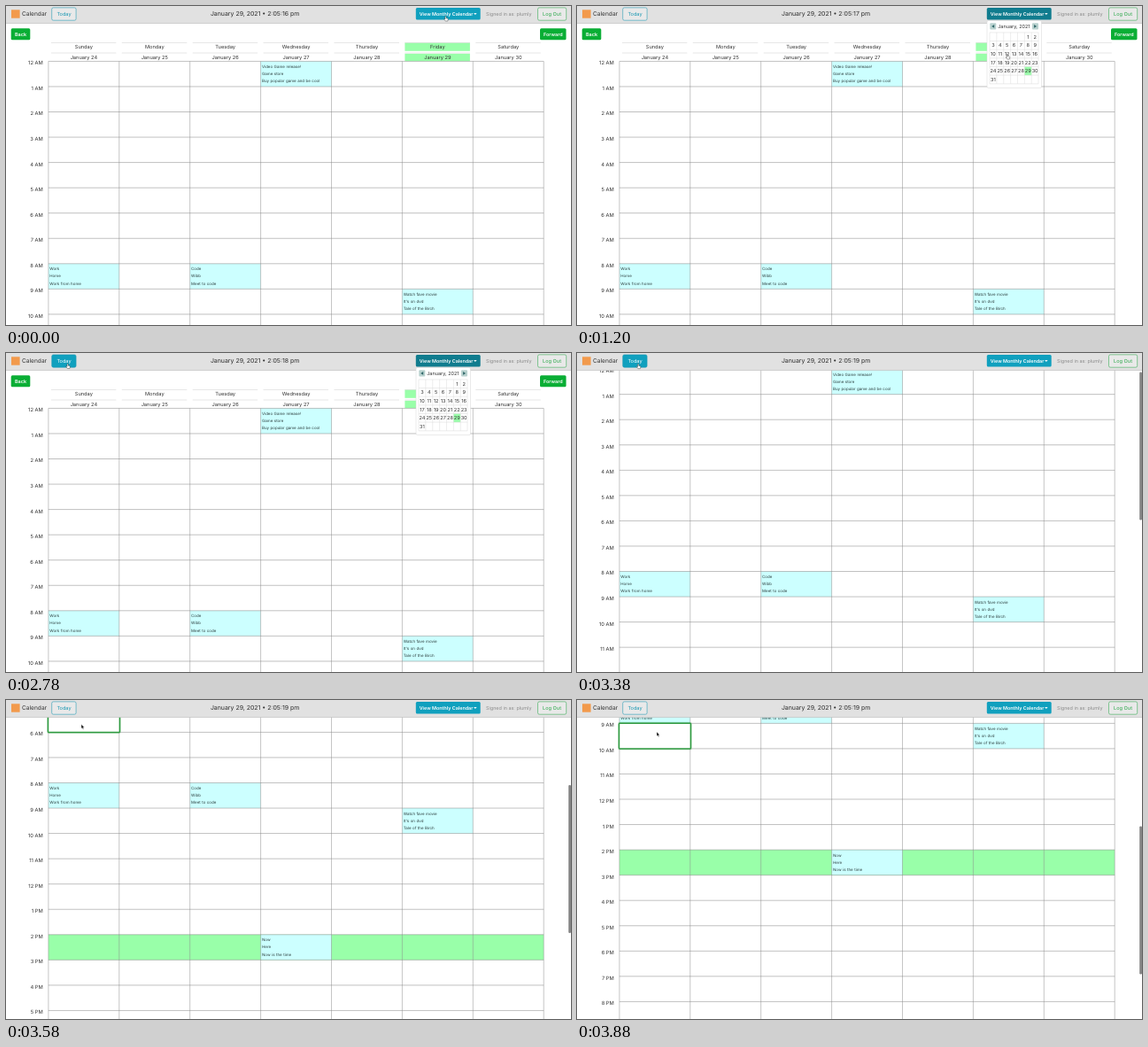
An HTML page for the animation above (3900 ms loop, 638x360 px).

```html
<!DOCTYPE html>
<html lang="en">
<head>
<meta charset="utf-8">
<title>Calendar</title>
<style>
  html, body { margin: 0; width: 100%; height: 100%; overflow: hidden; background: #fff; }
  svg { display: block; width: 638px; height: 360px; }
  text { font-family: Inter, Roboto, "Liberation Sans", sans-serif; text-rendering: geometricPrecision; }
  .note { word-spacing: .06em; }
</style>
</head>
<body>
<svg id="stage" viewBox="0 0 638 360" xmlns="http://www.w3.org/2000/svg"></svg>
<script>
const LOOP = 3900;
const LEFT = 47.9, TOP = 62.4, COL = 79.9, ROW = 28.55;
const RIGHT = LEFT + 7 * COL, BOTTOM = TOP + 24 * ROW;
const GREEN = '#99ffa9', CYAN = '#ccffff', TEAL = [16, 160, 190], DEEP = [16, 124, 142];

const DAYS = ['Sunday', 'Monday', 'Tuesday', 'Wednesday', 'Thursday', 'Friday', 'Saturday'];
const EVENTS = [
  { day: 3, hour: 0, lines: ['Video Game release!', 'Game store', 'Buy popular game and be cool'] },
  { day: 0, hour: 8, lines: ['Work', 'Home', 'Work from home'] },
  { day: 2, hour: 8, lines: ['Code', 'Wibb', 'Meet to code'] },
  { day: 5, hour: 9, lines: ['Watch fave movie', "It's on dvd", 'Tale of the Birch'] },
  { day: 3, hour: 14, lines: ['Now', 'Here', 'Now is the time'] }
];

// Pointer tip: time, x, y
const PATH = [
  [0, 496.5, 11.5], [560, 496.5, 11.5], [800, 492, 33], [1080, 486.5, 54], [1200, 486, 54.5],
  [1300, 488, 62], [1400, 470, 52], [1500, 350, 34], [1620, 155, 19], [1820, 124, 17.5],
  [1960, 124, 17.5], [2200, 108, 26], [2460, 70, 12], [3380, 69, 12], [3500, 85, 27.5],
  [3740, 85, 27.5], [3880, 90, 36]
];
const TICKS = [600, 1600, 2800];
const OPEN = 280, CLOSE = 2900;
const SCROLL = { from: 3219, to: 3819, by: 293 };

const rect = (x, y, w, h, fill, extra = '') =>
  `<rect x="${x}" y="${y}" width="${w}" height="${h}" fill="${fill}" ${extra}/>`;
const line = (x1, y1, x2, y2, color, width = 0.5) =>
  `<path d="M${x1} ${y1}L${x2} ${y2}" stroke="${color}" stroke-width="${width}"/>`;
// y is the middle of the capitals
const text = (str, x, y, size, fill = '#333', anchor = 'middle', extra = '') =>
  `<text x="${x}" y="${y + size * 0.36}" font-size="${size}" fill="${fill}" text-anchor="${anchor}" ${extra}>${str}</text>`;
const BOLD = 'font-weight="600"';

function dayHeads() {
  return DAYS.map((name, i) => {
    const x = LEFT + i * COL, mid = x + COL / 2;
    const tint = i === 5 ? rect(x + 3, 41.5, 73.5, 9.3, GREEN) + rect(x + 3, 53.8, 73.5, 8.4, GREEN) : '';
    return tint + line(x + 3, 41.5, x + 76.5, 41.5, '#cfcfcf') + line(x + 3, 53, x + 76.5, 53, '#cfcfcf')
      + text(name, mid, 46.2, 5.7) + text(`January ${24 + i}`, mid, 58, 5.7);
  }).join('');
}

function grid() {
  let out = rect(LEFT, TOP + 14 * ROW, 7 * COL, ROW, GREEN);
  for (const e of EVENTS) out += rect(LEFT + e.day * COL, TOP + e.hour * ROW, COL, ROW, CYAN);
  for (let h = 0; h <= 24; h++) {
    const y = TOP + h * ROW;
    out += line(LEFT, y, RIGHT, y, '#808080');
    if (h < 24) out += text(`${h % 12 || 12} ${h < 12 ? 'AM' : 'PM'}`, 41.8, y + 1.9, 5.8, '#333', 'end');
  }
  for (let c = 0; c <= 7; c++) {
    const x = LEFT + c * COL;
    out += line(x, TOP, x, BOTTOM, '#8a8a8a');
  }
  return out;
}

function eventTexts() {
  return EVENTS.map(e => e.lines.map((s, i) =>
    text(s, LEFT + e.day * COL + 1.4, TOP + e.hour * ROW + 5.9 + i * 8.15, 4.45, '#2c3c3c', 'start', 'class="note"')).join('')).join('');
}

function picker() {
  const x0 = 466, y0 = 29.9, w = 7.87, h = 9.65;
  let out = rect(463, 16.5, 61.5, 76, '#fff', 'rx="1.5" stroke="#d4d4d4" stroke-width=".5"');
  for (const [x, s] of [[466.3, -1], [514, 1]]) {
    const c = x + 3.5;
    out += rect(x, 19.3, 7, 7.2, '#b9d2cf', 'rx="1"')
      + `<path d="M${c + 1.6 * s} 22.9l${-3 * s} -1.8v3.6z" fill="#2f6668"/>`;
  }
  out += text('January, 2021', 493.4, 23.3, 5.5);
  out += rect(x0 + 5 * w, y0 + 4 * h, w, h, GREEN);
  for (let r = 0; r <= 6; r++) out += line(x0, y0 + r * h, x0 + 7 * w, y0 + r * h, '#dadada');
  for (let c = 0; c <= 7; c++) out += line(x0 + c * w, y0, x0 + c * w, y0 + 6 * h, '#dadada');
  for (let d = 1; d <= 31; d++) {
    const cell = d + 4;
    out += text(d, x0 + (cell % 7 + 0.5) * w, y0 + (Math.floor(cell / 7) + 0.5) * h, 5.6);
  }
  return out;
}

const stage = document.getElementById('stage');
stage.innerHTML = `
  ${rect(0, 0, 638, 360, '#fff')}
  <g id="page">
    ${rect(5.7, 25.2, 21.6, 13, '#0aae35', 'rx="1.5"')}${text('Back', 16.5, 31.7, 5.5, '#fff', 'middle', BOLD)}
    ${rect(603, 25.2, 29.5, 13, '#0aae35', 'rx="1.5"')}${text('Forward', 617.8, 31.7, 5.4, '#fff', 'middle', BOLD)}
    ${dayHeads()}${grid()}
    <g id="focus">
      ${rect(0, 0, COL + 1, ROW, 'none', 'stroke="#2f9a40" stroke-opacity=".25" stroke-width="3" rx="1"')}
      <rect id="cell" width="${COL + 1}" height="${ROW}" stroke="#2f9a40" stroke-width="1.5" rx=".8"/>
    </g>
    ${eventTexts()}
  </g>
  ${rect(0, 0, 638, 19.6, '#e1e1e1')}${line(0, 19.5, 638, 19.5, '#bdbdbd', 0.6)}
  ${rect(6, 4.3, 9.6, 9.4, '#f29a4c')}
  ${text('Calendar', 18, 9, 6.6, '#333', 'start')}
  <rect id="today" x="51.7" y="1.9" width="27.4" height="14.3" rx="1.8" stroke="#1897b2" stroke-width=".55"/>
  ${text('Today', 65.5, 9, 5.6, '#1897b2', 'middle', 'id="todayText"')}
  ${text('', 281.1, 8.2, 6.95, '#2b2b2b', 'middle', 'id="clock"')}
  <rect id="month" x="462.8" y="2" width="72.9" height="13.6" rx="1.5"/>
  ${text('View Monthly Calendar', 466.7, 8.9, 5.4, '#fff', 'start', BOLD)}
  <path d="M528.2 8h3.4l-1.7 1.9z" fill="#fff"/>
  ${text('Signed in as: plumly', 542, 9, 5.45, '#8b8b8b', 'start')}
  ${rect(600.5, 1.9, 32.2, 14.3, '#e9e9e9', 'rx="1.8" stroke="#2ba84a" stroke-width=".55"')}
  ${text('Log Out', 616.5, 9, 5.6, '#2ba84a')}
  <g id="picker">${picker()}</g>
  <rect id="thumb" x="635.2" width="2.8" height="167" rx="1.2" fill="#858585"/>
  <g id="pointer">
    <path id="arrow" d="M0 0v4.8l1.1-1 .8 1.8.9-.4-.8-1.7h1.5z" fill="#111" stroke="#fff" stroke-width=".35"/>
    <path id="hand" d="M-.6.2q.6-.6 1.2 0v2l1.6.4q.7.3.5 1l-.4 1.9h-2.6l-1.6-2.1q0-.7.7-.4l.6.5z" fill="#fff" stroke="#222" stroke-width=".4"/>
  </g>`;

const el = {};
for (const node of stage.querySelectorAll('[id]')) el[node.id] = node;

const ramp = (t, from, to) => Math.min(1, Math.max(0, (t - from) / (to - from)));
const mix = (a, b, k) => `rgb(${a.map((v, i) => Math.round(v + (b[i] - v) * k))})`;
const inside = (x, y, x1, y1, x2, y2) => x >= x1 && x <= x2 && y >= y1 && y <= y2;
const show = (node, on) => node.setAttribute('visibility', on ? 'visible' : 'hidden');

// cubic-bezier(.42, 0, .58, 1)
function easeInOut(p) {
  let lo = 0, hi = 1;
  for (let i = 0; i < 24; i++) {
    const u = (lo + hi) / 2, v = 1 - u;
    if (3 * v * v * u * 0.42 + 3 * v * u * u * 0.58 + u * u * u < p) lo = u; else hi = u;
  }
  return lo * lo * (3 - 2 * lo);
}

function pointerAt(t) {
  let i = 0;
  while (i < PATH.length - 2 && t >= PATH[i + 1][0]) i++;
  const [t1, x1, y1] = PATH[i], [t2, x2, y2] = PATH[i + 1], k = ramp(t, t1, t2);
  return [x1 + (x2 - x1) * k, y1 + (y2 - y1) * k];
}

function draw(t) {
  const [x, y] = pointerAt(t);
  const open = t >= OPEN && t < CLOSE;
  const scroll = SCROLL.by * easeInOut(ramp(t, SCROLL.from, SCROLL.to));

  el.page.setAttribute('transform', `translate(0 ${-scroll})`);
  show(el.thumb, t >= SCROLL.from);
  el.thumb.setAttribute('y', scroll * 0.486);

  const row = Math.floor((y + scroll - TOP) / ROW);
  const hover = row >= 0 && y > 20 && x > LEFT && x < LEFT + COL;
  show(el.focus, hover);
  el.focus.setAttribute('transform', `translate(${LEFT - 0.4} ${TOP + row * ROW})`);
  el.cell.setAttribute('fill', EVENTS.some(e => e.day === 0 && e.hour === row) ? CYAN : row === 14 ? GREEN : '#fff');

  const lit = ramp(t, 2430, 2580) * (1 - ramp(t, 3400, 3550));
  el.today.setAttribute('fill', mix([233, 233, 233], TEAL, lit));
  el.todayText.setAttribute('fill', mix([24, 151, 178], [255, 255, 255], lit > 0.5 ? lit : 0));
  el.month.setAttribute('fill', mix(TEAL, DEEP, ramp(t, 20, 170) * (1 - ramp(t, CLOSE, CLOSE + 150))));

  el.clock.textContent = `January 29, 2021 • 2:05:${16 + TICKS.filter(k => t >= k).length} pm`;
  show(el.picker, open);

  const hand = inside(x, y, 462, 1, 536, 16) || inside(x, y, 51, 1, 80, 17)
    || (open && inside(x, y, 466, 29, 521, 88));
  show(el.hand, hand);
  show(el.arrow, !hand);
  el.pointer.setAttribute('transform', `translate(${x} ${y})`);
}

const start = performance.now();
function tick() {
  draw((performance.now() - start) % LOOP);
  requestAnimationFrame(tick);
}
tick();
</script>
</body>
</html>
```
